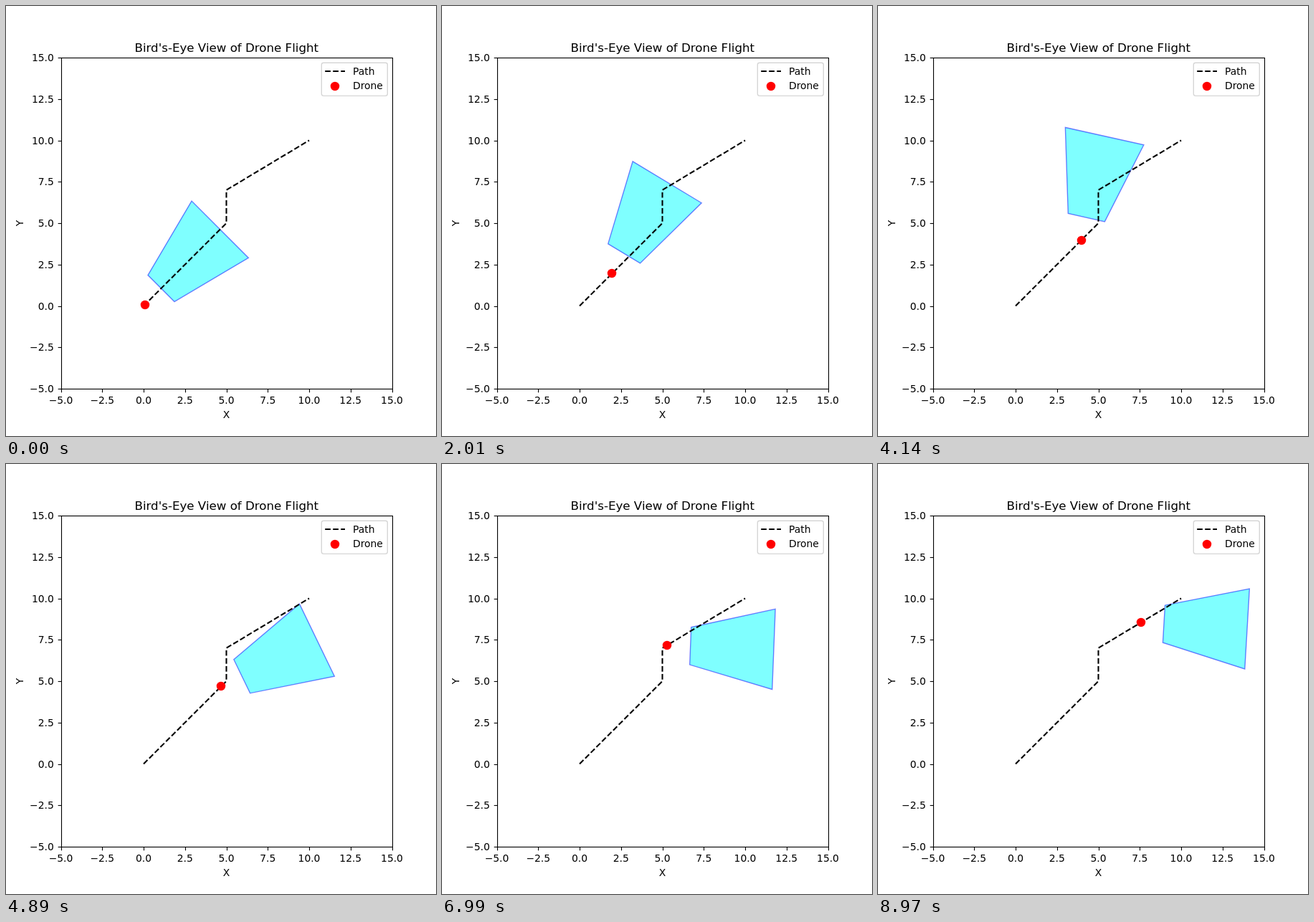
These frames come from a looping animation (600 px wide and 600 px high, 9000 ms). An HTML page with a canvas:

```html
<!DOCTYPE html>
<html>
<head>
<meta charset="utf-8">
<style>
html, body { margin: 0; width: 100%; height: 100%; overflow: hidden; background: #fff; }
canvas { display: block; }
</style>
</head>
<body>
<canvas id="stage" width="600" height="600"></canvas>
<script>
const g = document.getElementById('stage').getContext('2d');
const PT = 100 / 72, UNIT = 23.1, EM = 10 * PT;
const LEFT = 77.5, RIGHT = 539.5, TOP = 72.5, BOTTOM = 534.5;
const ROUTE = [[0, 0], [5, 5], [5, 7], [10, 10]];
const px = x => 192 + x * UNIT;
const py = y => 418.5 - y * UNIT;
const rad = deg => deg * Math.PI / 180;

// Ground footprint of a camera at height 3, pitched 45°, with a 40° field of view
function groundEdge(pitch) {
  const depth = 3 / Math.sin(rad(pitch)) * Math.cos(rad(20));
  return [3 / Math.tan(rad(pitch)), depth * Math.tan(rad(20))];
}
const [near, nearHalf] = groundEdge(65);
const [far, farHalf] = groundEdge(25);
const FOOTPRINT = [[near, nearHalf], [far, farHalf], [far, -farHalf], [near, -nearHalf]];

function locate(dist) {
  for (let i = 0; ; i++) {
    const [x, y] = ROUTE[i], [u, v] = ROUTE[i + 1];
    const len = Math.hypot(u - x, v - y);
    if (dist <= len || i === ROUTE.length - 2) {
      const k = dist / len;
      return { x: x + (u - x) * k, y: y + (v - y) * k, heading: Math.atan2(v - y, u - x) };
    }
    dist -= len;
  }
}

function text(str, x, y, align = 'center', size = EM) {
  g.font = `${size}px "DejaVu Sans", sans-serif`;
  g.textAlign = align;
  g.fillStyle = '#000';
  g.fillText(str, x, y);
}

function trace(points) {
  g.beginPath();
  points.forEach(([x, y]) => g.lineTo(x, y));
}

function line(points, width) {
  trace(points);
  g.strokeStyle = '#000';
  g.lineWidth = width;
  g.stroke();
}

function dashed(points) {
  g.setLineDash([5.55 * PT, 2.4 * PT]);
  line(points, 1.5 * PT);
  g.setLineDash([]);
}

function dot(x, y) {
  g.beginPath();
  g.arc(x, y, 4.5 * PT, 0, 7);
  g.fillStyle = '#f00';
  g.fill();
}

function drawFootprint({ x, y }, yaw) {
  const c = Math.cos(yaw), s = Math.sin(yaw);
  trace(FOOTPRINT.map(([a, b]) => [px(x + a * c - b * s), py(y + a * s + b * c)]));
  g.closePath();
  g.fillStyle = 'rgba(0,255,255,.5)';
  g.fill();
  g.strokeStyle = 'rgba(0,0,255,.5)';
  g.lineWidth = PT;
  g.stroke();
}

function drawAxes() {
  const thin = 0.8 * PT, tick = 3.5 * PT;
  for (let v = -5; v <= 15; v += 2.5) {
    const x = Math.round(px(v)) + .5, y = Math.round(py(v)) + .5;
    const label = v.toFixed(1).replace('-', '\u2212');
    line([[x, BOTTOM], [x, BOTTOM + tick]], thin);
    line([[LEFT, y], [LEFT - tick, y]], thin);
    text(label, px(v), 555);
    text(label, 66.8, Math.round(py(v) + 5), 'right');
  }
  g.strokeStyle = '#000';
  g.lineWidth = thin;
  g.strokeRect(LEFT, TOP, RIGHT - LEFT, BOTTOM - TOP);
  text("Bird's-Eye View of Drone Flight", 307.8, 64, 'center', 12 * PT);
  text('X', 307.5, 575);
  g.save();
  g.translate(24, 303);
  g.rotate(-Math.PI / 2);
  text('Y', 0, 0);
  g.restore();
}

function drawLegend() {
  g.beginPath();
  g.roundRect(440.3, 79.2, 92, 46.2, 2.78);
  g.fillStyle = 'rgba(255,255,255,.8)';
  g.fill();
  g.strokeStyle = 'rgba(204,204,204,.8)';
  g.lineWidth = PT;
  g.stroke();
  dashed([[445.2, 91], [473, 91]]);
  dot(459, 112);
  text('Path', 484, 96, 'left');
  text('Drone', 484, 116, 'left');
}

function draw() {
  const step = Math.floor(performance.now() % 9000 / 30);
  const drone = locate(0.1 + 0.04 * step);
  g.fillStyle = '#fff';
  g.fillRect(0, 0, 600, 600);
  drawFootprint(drone, drone.heading + 0.6 * Math.sin(step / 10));
  dashed(ROUTE.map(([x, y]) => [px(x), py(y)]));
  dot(Math.round(px(drone.x)), Math.round(py(drone.y)));
  drawAxes();
  drawLegend();
  requestAnimationFrame(draw);
}
draw();
</script>
</body>
</html>
```
